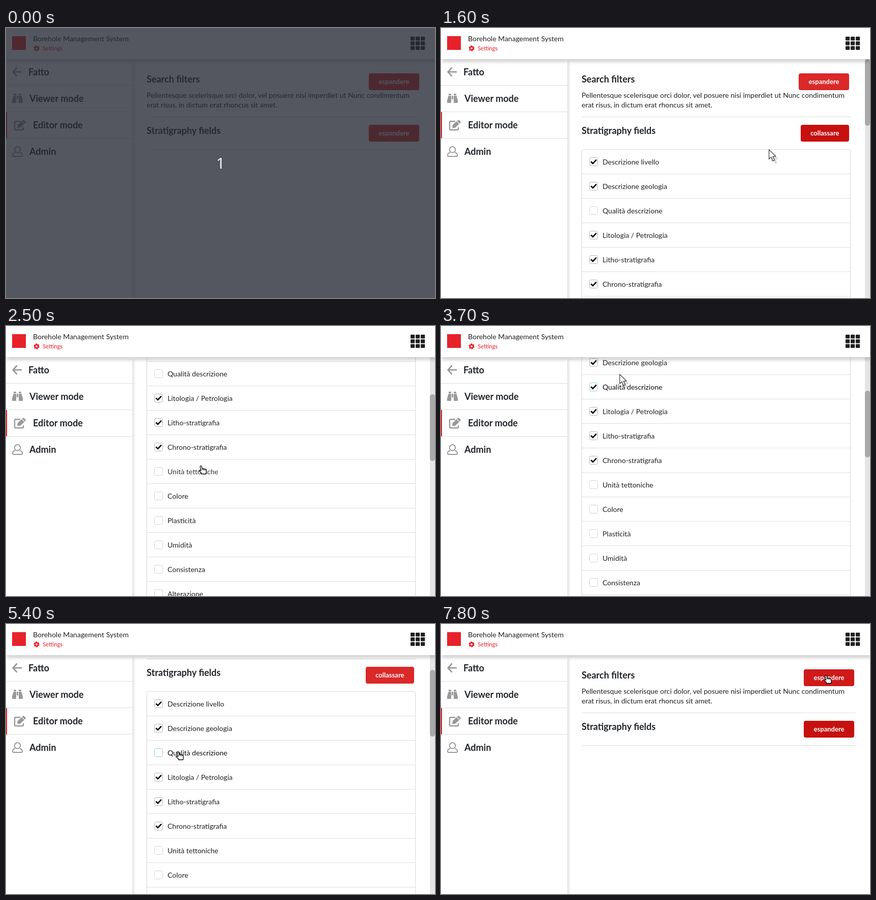
An HTML page for the animation above (8000 ms loop, 842x530 px).

```html
<!DOCTYPE html>
<html lang="it">
<head>
<meta charset="utf-8">
<title>Borehole Management System</title>
<style>
html, body { margin: 0; width: 100%; height: 100%; overflow: hidden; background: #fff; }
#stage { position: relative; width: 842px; height: 530px; overflow: hidden; background: #fff;
  font: 14px/20px Lato, sans-serif; color: #212121; }
#stage div, #stage svg { position: absolute; box-sizing: border-box; white-space: nowrap; }
#head { left: 0; top: 0; width: 842px; height: 61px; background: #fff; z-index: 3;
  box-shadow: 2px 6px 6px rgba(0,0,0,.17); }
#side { left: 0; top: 61px; width: 248px; height: 469px; background: #fff; z-index: 2;
  box-shadow: 2px 6px 6px rgba(0,0,0,.17); }
.h3 { font-size: 18px; font-weight: 700; line-height: 24px; color: #212529; }
.item { left: 0; width: 248px; height: 52px; border-bottom: 1px solid #dcdcdc; }
.item:last-of-type { border: 0; }
.item.on { border-left: 2px solid #ed1c24; }
#icons { left: 0; top: 0; z-index: 4; }
#view { left: 249px; top: 61px; width: 593px; height: 469px; overflow: hidden; }
#page { left: -249px; top: -61px; width: 842px; height: 1680px; }
.rule { left: 276px; height: 1px; background: #dcdcdd; }
.btn { height: 33.4px; padding: 0 19.5px; border-radius: 4px; background: #db2828; color: #fff;
  font-size: 13px; font-weight: 700; line-height: 33px; }
#list { left: 276px; top: 238px; width: 528px; height: 1430px; border: 1px solid #dededf;
  border-radius: 4px; box-shadow: 0 1px 2px rgba(34,36,38,.15); }
.row { left: 0; width: 526px; height: 48px; border-bottom: 1px solid #dededf; }
.row div { left: 40px; top: 14px; color: rgba(0,0,0,.87); }
.row svg { left: 14px; top: 15px; }
.row rect { fill: #fff; stroke: #d4d4d5; }
.row path { fill: none; stroke: #000; stroke-width: 2.6; visibility: hidden; }
.row.on rect { stroke: #b3b3b4; }
.row.on path { visibility: visible; }
.row.hover div { color: rgba(0,0,0,.78); }
.row.focus div { color: rgba(0,0,0,.95); }
.row.focus rect { stroke: #96c8da; }
#track { left: 832px; top: 61px; width: 10px; height: 469px; background: #e5e5e5; }
#thumb { left: 0; width: 10px; height: 131px; border-radius: 5px; background: #a9a9a9; }
#arrow, #hand { z-index: 5; overflow: visible; }
#veil { inset: 0; z-index: 6; background: rgba(39,42,53,.79); color: #fff;
  font: 30px/530px "Open Sans", sans-serif; text-align: center; }
</style>
</head>
<body>
<div id="stage">
  <div id="view"><div id="page">
    <div class="h3" style="left:276px;top:88px">Search filters</div>
    <div style="left:276px;top:122px">Pellentesque scelerisque orci dolor, vel posuere nisi imperdiet ut Nunc condimentum</div>
    <div style="left:276px;top:141px">erat risus, in dictum erat rhoncus sit amet.</div>
    <div class="btn" id="filters" style="top:89px">espandere</div>
    <div class="rule" style="top:174px"></div>
    <div class="h3" style="left:276px;top:189px">Stratigraphy fields</div>
    <div class="btn" id="fields" style="top:190px">espandere</div>
    <div class="rule" id="last" style="top:238px"></div>
    <div id="list"></div>
  </div></div>
  <div id="track"><div id="thumb"></div></div>
  <div id="side">
    <div class="item" style="top:0"><div class="h3" style="left:44px;top:13px">Fatto</div></div>
    <div class="item" style="top:52px"><div class="h3" style="left:46px;top:13px">Viewer mode</div></div>
    <div class="item on" style="top:104px"><div class="h3" style="left:51px;top:13px">Editor mode</div></div>
    <div class="item" style="top:156px"><div class="h3" style="left:46px;top:13px">Admin</div></div>
  </div>
  <div id="head">
    <div style="left:53px;top:11px">Borehole Management System</div>
    <div style="left:72px;top:30px;font-size:11.2px;color:#ed1c24">Settings</div>
  </div>
  <svg id="icons" width="842" height="260" fill="none">
    <rect x="12" y="16" width="27" height="27" fill="#e8222a"/>
    <g stroke="#ed1c24">
      <circle cx="60" cy="40" r="3.2" stroke-width="2.6"/>
      <circle cx="60" cy="40" r="4.8" stroke-width="1.8" stroke-dasharray="2.7 2.33"/>
    </g>
    <g id="grid" fill="#212121"></g>
    <g stroke="#999" stroke-width="2.8">
      <path d="M21.5 77.5 13.8 86.2l7.7 8.7M14 86.2h17"/>
    </g>
    <g fill="#999">
      <path d="M15 129h5v3h-5zM25 129h5v3h-5zM14.6 133H20v14h-8v-4.5zM30.4 133H25v14h8v-4.500zM21 133h3v7h-3z"/>
      <path d="M22.500 190.500 33 180.800q1.200-1 2.400 0l3 2.900q1 1.200 0 2.300L28 195.700l-5.700.900z"/>
    </g>
    <path d="M34 195v3.200q0 1.800-1.800 1.800H18.800q-1.800 0-1.800-1.800V185q0-1.800 1.800-1.800H28" stroke="#999" stroke-width="2.400"/>
    <path d="m31 182.700 5.300 5.200" stroke="#fff" stroke-width="1.200"/>
    <g stroke="#999" stroke-width="2">
      <circle cx="22.500" cy="238.800" r="5.800"/>
      <path d="M18 244.500q-5 .5-5 5.500 0 2 2 2h15q2 0 2-2 0-5-5-5.500"/>
    </g>
  </svg>
  <svg id="arrow" width="22" height="30">
    <path d="M5 5v20l4.500-4 3.500 8 4-1.800-3.500-7.500h6z" fill="#000" opacity=".15"/>
    <path d="M.8.9v18.300l4.300-3.900 3.300 7.600 3.200-1.400-3.200-7.300 5.600-.4z" fill="#fff" stroke="#333" stroke-width="1.200"/>
  </svg>
  <svg id="hand" width="16" height="18">
    <path d="M4 .7C5 .4 5.900 1 6.100 2L7 6l5 .6c2 .4 3 1.400 3 2.900v4l-.5 3h-9L5 14l-3.800-3C.3 10 1 8.800 2.300 9.200l2.300 1.100L3 2.200C2.900 1.400 3.300.8 4 .7z" fill="#fff" stroke="#000" stroke-width="1.300" stroke-linejoin="round"/>
    <path d="M7 6v3M9.600 6.600v2.800M12.200 7v2.600" stroke="#000"/>
  </svg>
  <div id="veil">1</div>
</div>
<script>
const $ = id => document.getElementById(id);
const LOOP = 8000, STEP = 100, OPEN = 1300, CLOSE = 7600;

const names = ['Descrizione livello', 'Descrizione geologia', 'Qualità descrizione',
  'Litologia / Petrologia', 'Litho-stratigrafia', 'Chrono-stratigrafia', 'Unità tettoniche',
  'Colore', 'Plasticità', 'Umidità', 'Consistenza', 'Alterazione'];
const ticked = [0, 1, 3, 4, 5];

// [time, row] of each checkbox click
const clicks = [[3400, 2], [5400, 2], [5800, 4], [6100, 3], [6500, 2], [6800, 3]];

// [time, scroll offset]
const scrolls = [[1800, 0], [2400, 265], [3600, 265], [3800, 212], [4000, 212], [4300, 106]];

// [time, x, y] of the pointer
const path = [[800, 733, 376], [900, 733, 376], [1200, 757, 210], [1300, 757, 210],
  [1500, 716, 224], [1600, 643, 238], [1800, 490, 280], [2100, 400, 288], [2500, 382, 274],
  [2700, 410, 310], [2900, 476, 390], [3200, 362, 100], [3400, 352, 92], [4000, 348, 95],
  [4400, 326, 325], [4500, 324, 338], [4700, 324, 338], [4900, 412, 294], [5100, 337, 249],
  [5400, 337, 250], [5700, 332, 340], [5800, 332, 340], [5900, 340, 318], [6000, 340, 318],
  [6100, 344, 303], [6200, 352, 285], [6300, 360, 258], [6500, 346, 252], [6800, 330, 292],
  [6900, 330, 292], [7000, 601, 192], [7100, 601, 192], [7400, 755, 100], [8000, 755, 100]];

function at(keys, t, i) {
  if (t <= keys[0][0]) return keys[0][i];
  const n = keys.findIndex(k => k[0] >= t);
  if (n < 0) return keys[keys.length - 1][i];
  const a = keys[n - 1], b = keys[n];
  return a[i] + (b[i] - a[i]) * (t - a[0]) / (b[0] - a[0]);
}

const rows = names.map((name, i) => {
  const row = document.createElement('div');
  row.className = 'row';
  row.style.top = i * 48 + 'px';
  row.innerHTML = '<svg width="17" height="17"><rect x=".5" y=".5" width="16" height="16" rx="3"/>' +
    '<path d="M3.200 8.300 7 12l7-7.300"/></svg><div>' + name + '</div>';
  $('list').append(row);
  return row;
});

for (let i = 0; i < 9; i++) {
  const x = 794 + i % 3 * 10, y = 17 + Math.floor(i / 3) * 9.2;
  $('grid').innerHTML += `<rect x="${x}" y="${y}" width="8.200" height="7.600" rx="1"/>`;
}

function place(el, x, y, shown) {
  el.style.left = x + 'px';
  el.style.top = y + 'px';
  el.style.visibility = shown ? 'visible' : 'hidden';
}

function draw(t) {
  const open = t >= OPEN && t < CLOSE;
  const scroll = open ? Math.round(at(scrolls, t, 1)) : 0;
  const right = open ? 804 : 814;
  const x = Math.round(at(path, t, 1)), y = Math.round(at(path, t, 2)), py = y + scroll;

  $('page').style.top = -61 - scroll + 'px';
  $('list').style.display = $('track').style.display = open ? '' : 'none';
  $('last').style.display = open ? 'none' : '';
  $('thumb').style.top = scroll * .275 + 'px';
  document.querySelectorAll('.rule').forEach(r => r.style.width = right - 276 + 'px');

  const overBtn = top => t >= 800 && x > 706 && x < 811 && py >= top && py < top + 33;
  const hitFilters = overBtn(89), hitFields = overBtn(190);
  const focused = (t >= OPEN && t < clicks[0][0]) || t >= CLOSE;
  $('fields').textContent = open ? 'collassare' : 'espandere';
  $('filters').style.right = $('fields').style.right = 842 - right + 3 + 'px';
  $('filters').style.background = hitFilters ? '#d01919' : '';
  $('fields').style.background = focused ? '#c6110e' : hitFields ? '#d01919' : '';

  const done = clicks.filter(c => t >= c[0]);
  const focus = done.length ? done[done.length - 1][1] : -1;
  let hitRow = false;
  rows.forEach((row, i) => {
    const hover = open && x > 290 && x < 446 && Math.abs(py - 262.5 - i * 48) < 12.500;
    const flips = done.filter(c => c[1] === i).length;
    row.classList.toggle('on', ticked.includes(i) !== (flips % 2 === 1));
    row.classList.toggle('focus', i === focus);
    row.classList.toggle('hover', hover);
    hitRow = hitRow || hover;
  });

  const hand = hitFilters || hitFields || hitRow;
  place($('arrow'), x, y, t >= 800 && !hand);
  place($('hand'), x - 4, y, t >= 800 && hand);
  $('veil').style.opacity = t < 200 ? 1 : t < 300 ? .67 : t < 400 ? .33 : 0;
}

const start = performance.now();
function tick() {
  const t = (performance.now() - start) % LOOP;
  draw(Math.floor(t / STEP) * STEP);
  requestAnimationFrame(tick);
}
tick();
</script>
</body>
</html>
```
